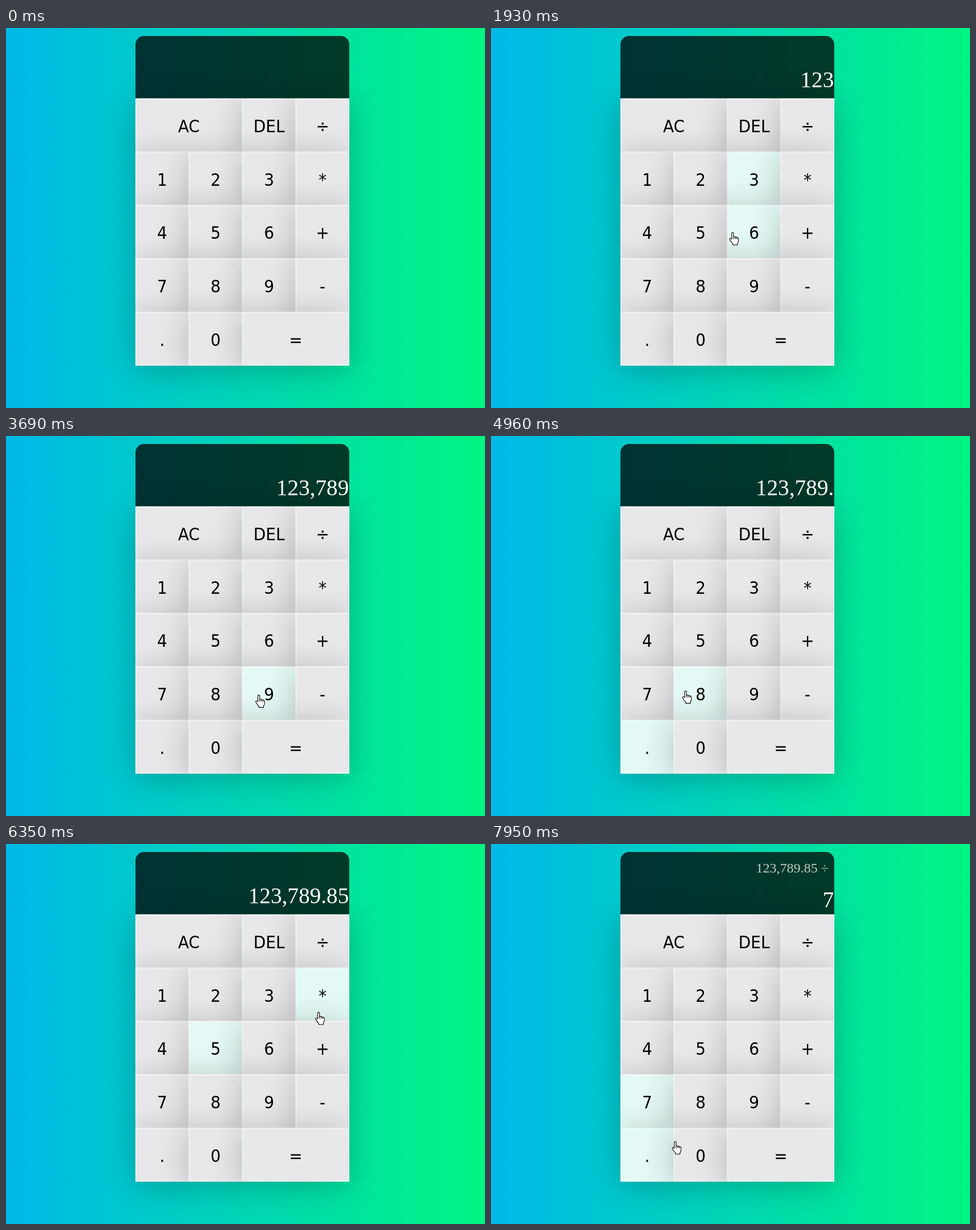
These frames come from a looping animation (840x667 px, 8000 ms). An HTML page:

```html
<!DOCTYPE html>
<html lang="en">
<head>
<meta charset="utf-8">
<title>Calculator</title>
<style>
  html, body { margin: 0; width: 100%; height: 100%; overflow: hidden; }
  body { position: relative; background: linear-gradient(to right, #00b8e8, #00f582); }
  #calculator {
    position: absolute; left: 226.5px; top: 13.5px; width: 400px;
    transform: scale(.9375); transform-origin: 0 0;
    display: grid; grid-template: 117px repeat(5, 100px) / repeat(4, 100px);
  }
  #display { grid-column: span 4; background: rgba(0, 0, 0, .75); border-radius: 16px 16px 0 0; }
  .key {
    display: flex; align-items: center; justify-content: center;
    box-sizing: border-box; padding-top: 2px; border: 1px solid #fff;
    background: #e8e8ea; color: #000;
    font: condensed 33px "DejaVu Sans Condensed", "DejaVu Sans", sans-serif;
    box-shadow: 0 8px 60px rgba(0, 0, 0, .24);
  }
  .key.wide { grid-column: span 2; }
  .key.lit { background: #e4f9f5; }
  svg { position: absolute; left: 0; top: 0; }
  text { font-family: "Liberation Serif", serif; text-anchor: end; fill: #fff; }
</style>
</head>
<body>
<div id="calculator"><div id="display"></div></div>
<svg width="840" height="667">
  <text id="previous" x="592" font-size="24" fill-opacity=".75"></text>
  <text id="current" x="601.3" font-size="39.2"></text>
  <g id="cursor" stroke="#000" stroke-width="1.1" stroke-linejoin="round">
    <path fill="#fff" d="M-1.5 12.3V2a1.6 1.6 0 0 1 3.2 0V8q1.5-1.2 3 .6 1.7-.8 2.8.8 2.2-.6 2.7 1.6V15q0 2.5-1.8 4.8V22.2H.5V20.2Q-2 18-4.6 13.5q-1.2-2 .2-2.8 1.5-.6 2.9 1.6z"/>
    <path fill="none" d="M1.7 8v4M4.7 8.8v3.2M7.5 9.6v2.6"/>
  </g>
</svg>
<script>
const LOOP = 8000, HOVER_LAG = 80;
const $ = id => document.getElementById(id);

// Pointer stops: ms, tip x, tip y, key pressed there
const stops = [
  [70, 728, 616],
  [740, 275, 270, '1'],
  [1080, 378, 275, '2'],
  [1230, 425, 278],
  [1500, 466, 275, '3'],
  [1720, 466, 277],
  [2280, 333, 528],
  [2540, 333, 528],
  [2740, 320, 504],
  [2960, 283, 455, '7'],
  [3260, 368, 457, '8'],
  [3560, 444, 454, '9'],
  [3850, 440, 455],
  [4560, 272, 537, '.'],
  [4960, 341, 447],
  [5090, 350, 445, '8'],
  [5600, 375, 360, '5'],
  [6350, 548, 295],
  [6850, 555, 185, '÷'],
  [7550, 278, 460, '7'],
  [7950, 323, 522]
];

const keys = ['AC', 'DEL', ...'÷123*456+789-.0='].map(label => {
  const el = document.createElement('div');
  el.className = label === 'AC' || label === '=' ? 'key wide' : 'key';
  el.textContent = label;
  $('calculator').append(el);
  return { label, el };
});
for (const key of keys) key.box = key.el.getBoundingClientRect();

const slope = (i, axis) => {
  const a = stops[i], b = stops[i + 1];
  return a && b ? (b[axis] - a[axis]) / (b[0] - a[0]) : 0;
};

// Monotone tangent, so the pointer never overshoots a stop
const tangent = (i, axis) => {
  const before = slope(i - 1, axis), after = slope(i, axis);
  return before * after > 0 ? 2 * before * after / (before + after) : 0;
};

function pointerAt(t) {
  if (t < stops[0][0]) return null;
  const next = stops.findIndex(stop => stop[0] > t);
  if (next < 0) return stops.at(-1).slice(1);
  const i = next - 1, a = stops[i], b = stops[next];
  const span = b[0] - a[0], u = (t - a[0]) / span, v = 1 - u;
  return [1, 2].map(axis =>
    a[axis] * v * v * (1 + 2 * u) + b[axis] * u * u * (3 - 2 * u) +
    span * u * v * (tangent(i, axis) * v - tangent(next, axis) * u));
}

function grouped(number) {
  const [whole, fraction] = number.split('.');
  const text = whole && Number(whole).toLocaleString('en');
  return fraction === undefined ? text : text + '.' + fraction;
}

function render(t) {
  const pressed = stops.filter(([at, , , key]) => key && at <= t).map(stop => stop[3]);
  const [first, second] = pressed.join('').split('÷');
  const divided = second !== undefined;
  $('previous').textContent = divided ? grouped(first) + ' ÷' : '';
  $('previous').setAttribute('y', second ? 49.5 : 61);
  $('current').textContent = grouped(divided ? second : first);
  $('current').setAttribute('y', divided ? 110.5 : 103.7);

  const hover = pointerAt(t - HOVER_LAG);
  for (const { label, el, box } of keys) {
    const hovered = hover && hover[0] >= box.left && hover[0] < box.right &&
      hover[1] >= box.top && hover[1] < box.bottom;
    el.classList.toggle('lit', Boolean(hovered) || label === pressed.at(-1));
  }

  const tip = pointerAt(t);
  $('cursor').style.display = tip ? '' : 'none';
  if (tip) $('cursor').setAttribute('transform', `translate(${tip})`);
}

const start = performance.now();
function tick() {
  render((performance.now() - start) % LOOP);
  requestAnimationFrame(tick);
}
tick();
</script>
</body>
</html>
```
